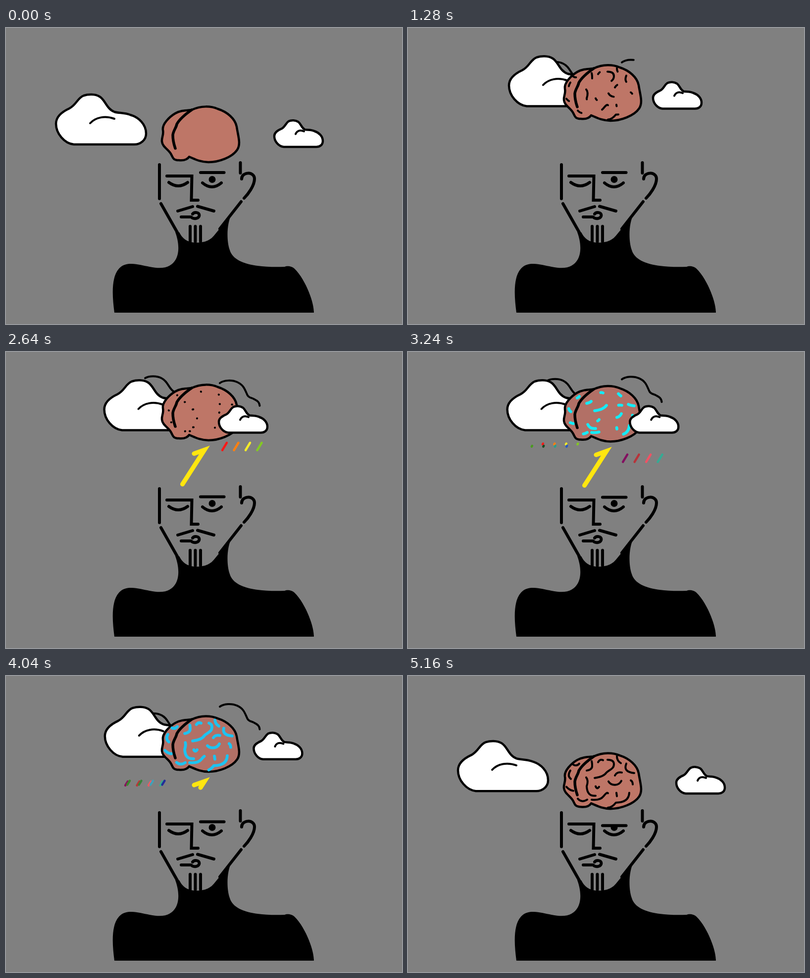
An HTML page that plays this animation: 800 px wide and 600 px high, repeating every 5200 ms.

```html
<!DOCTYPE html>
<html lang="en">
<head>
<meta charset="utf-8">
<title>Brain in the clouds</title>
<style>
html, body { margin: 0; width: 100%; height: 100%; overflow: hidden; background: #808080; }
svg { display: block; width: 800px; height: 600px; fill: none; stroke: #000; stroke-linecap: round; stroke-linejoin: round; }
.cloud { fill: #fff; stroke-width: 4.5; }
.thin { stroke-width: 4; }
.solid { fill: #000; stroke: none; }
</style>
</head>
<body>
<svg viewBox="0 0 800 600">
  <clipPath id="lid"><rect id="lidBox" x="380" y="293" width="80" height="60"/></clipPath>

  <path class="solid" d="M219 577C214 540 213 505 228 488C242 471 268 480 290 484C320 490 334 484 343 469C351 455 349 432 342 414L350 414C358 430 370 435 385 435C405 435 414 428 420 421L456 377C446 395 445 430 452 450C460 478 505 486 563 484C567 482 577 482 583 488C602 506 622 552 622 577Z"/>
  <g stroke-width="6">
    <path d="M310 277V346M313 356L347 416M475 352L432 407M473.500 273V294M476 306C476 291 502 290 502 306C502 320 488 338 481 345"/>
    <path d="M325 300H375.500L374.500 349H388" stroke-linejoin="miter"/>
    <path d="M329 313Q348 327 367 313M397 314Q416 330 435 314M347 371L377 362M387 361.500L420 371"/>
    <path d="M354 383H374C378 388 390.500 387 390.500 379.500C390.500 373 380 372.500 377 377"/>
    <path d="M372 402V433M382.500 402V433M393 402V433"/>
    <g clip-path="url(#lid)"><circle class="solid" cx="416.500" cy="307" r="7"/></g>
    <path id="brow" d="M393 293H440.500"/>
  </g>

  <path id="bolt" d="M356.500 361L401 291.500L380 299" stroke="#ffe60f" stroke-width="9" stroke-linejoin="miter" stroke-miterlimit="8" pathLength="1"/>

  <path id="waveL" class="thin" pathLength="1" d="M281 53C289 48 305 48 314 53C328 60 328 74 340 81"/>
  <path id="waveR" class="thin" pathLength="1" d="M432 63C440 57 456 56 467 61C481 67 483 78 488 88C492 94 496 92 502 96C508 99 512 102 512.500 109"/>

  <g id="left">
    <g id="rainL"></g>
    <path class="cloud" d="M137 236C118 234 101 214 101 194C101 179 115 169 128 163C143 155 144 142 157 137C166 134 180 133.500 189 139C201 146 203 164 219 170C228 173 238 171 251 176C268 181 283 195 283 214C283 228 271 236 259 236Z"/>
    <path class="thin" d="M170 193C181 181 200 177 219 184"/>
  </g>

  <g id="brain">
    <path id="lobe" stroke-width="4.500" d="M375 166C394 157 414 158 428 164C447 170 463 184 466 200C469 220 475 235 467 247C457 262 430 272 409 272C392 272 380 265 370 261C366 267 358 269 349 268C336 268 337 261 333 255C328 246 316 241 315 230C314 222 319 217 317 207C315 195 330 180 342 173C352 167 364 167 375 166Z"/>
    <g id="folds" transform="translate(0 2.5)"></g>
    <path stroke-width="5.500" d="M375 166C362 175 350 186 345 195C344 202 338 208 337 217C337 230 340 238 342 244"/>
  </g>

  <g id="right">
    <g id="rainR"></g>
    <path class="cloud" d="M561 241C551 240 542 230 542 219C542 211 550 207 557 204C564 200 565 193 571 189C577 186 585 187 590 190C596 194 597 203 604 206C610 207 617 206 623 209C632 212 640 219 640 229C640 237 634 241 627 241Z"/>
    <path class="thin" d="M585 215C588 208 594 206 602 209.500"/>
  </g>
</svg>
<script>
const LOOP = 5200, STEP = 40;
const $ = id => document.getElementById(id);
const clamp = v => Math.max(0, Math.min(1, v));
// Progress from a to b; runs from 1 down to 0 when a is later than b
const ramp = (t, a, b) => clamp((t - a) / (b - a));
const ease = (t, a, b) => { const u = ramp(t, a, b); return u * u * (3 - 2 * u); };
const mix = (a, b, k) => `color-mix(in srgb, ${b} ${100 * k}%, ${a})`;

function add(parent, attrs) {
  const path = document.createElementNS("http://www.w3.org/2000/svg", "path");
  for (const k in attrs) path.setAttribute(k, attrs[k]);
  return parent.appendChild(path);
}

const folds = [
  "M377 207Q395 205 401 196C407 190 416 189 416 179Q416 170 403 170",
  "M379 243Q362 245 361 224Q365 212 360 206",
  "M371 251Q388 253 395 244T404 238",
  "M447 237Q446 257 420 257Q412 267 404 267",
  "M431 213Q427 221 418 221T405 214",
  "M361 192Q372 190 372 183T371 173",
  "M362 251Q351 258 343 249",
  "M432 196Q422 194 418 202",
  "M457 197Q434 195 441 178",
  "M430 177Q422 172 422 163",
  "M454 220Q454 214 450 212",
  "M394 171Q388 168 384 175",
  "M386 225Q382 231 379 224",
  "M422 244L421 237",
  "M346 178Q341 184 334 180",
  "M329 209Q321 203 328 192",
  "M334 233Q326 232 320 225"
].map(d => add($("folds"), { d, pathLength: 1 }));

// Drops hang below their cloud, slide by (dx, dy) between two times and change colour
function rain({ id, colors, x, y, dx, dy, time: [t0, t1], life: [born, dead], w, h }) {
  const drops = colors.map(() => add($(id), { "stroke-width": 4.5 }));
  return t => {
    const u = (t - t0) / (t1 - t0);
    const size = ramp(t, born, born + 200) * ramp(t, dead, dead - 200);
    drops.forEach((drop, i) => {
      const cx = x + dx * u + i * 23.5, cy = y + dy * u, a = w * size / 2, b = h * size / 2;
      drop.style.display = size > 0 ? "" : "none";
      drop.setAttribute("d", `M${cx + a} ${cy - b}L${cx - a} ${cy + b}`);
      drop.style.stroke = mix(...colors[i], clamp(u));
    });
  };
}
const warm = [["#fc1a18", "#4b0a82"], ["#ff8010", "#95104e"], ["#f4ec28", "#f00a80"], ["#84c824", "#109cc8"]];
const cool = [["#4a9a20", "#2f7d32"], ["#1c4a24", "#48a048"], ["#28a08c", "#50a0d0"], ["#2858c0", "#221884"]];
const near = { id: "rainR", time: [2640, 3520], life: [2380, 3950], w: 9, h: 15 };
const far = { id: "rainL", time: [3520, 4320], life: [3200, 4800], w: 5, h: 8 };
const rains = [
  rain({ ...near, colors: warm, x: 553.5, y: 269, dx: -31, dy: 35 }),
  rain({ ...far, colors: warm, x: 163, y: 273, dx: -28, dy: 26 }),
  rain({ ...far, colors: cool, x: 150, y: 275.5, dx: -2, dy: 20 })
];

const move = (id, x, y) => $(id).setAttribute("transform", `translate(${x} ${y})`);
function trim(path, a, b) {
  path.style.display = b > a ? "" : "none";
  path.setAttribute("stroke-dasharray", `${b - a} 2`);
  path.setAttribute("stroke-dashoffset", -a);
}

function draw(t) {
  const there = Math.min(t, LOOP + 40 - t);   // out and back
  const drift = ease(there, 200, 2620);
  const cloudY = -77.5 * ease(t, 0, 1040) * (1 - ramp(t, 3900, LOOP) ** 1.2);
  const brainY = cloudY - 15.5 * drift;
  move("brain", 0, brainY);
  move("bolt", 0, brainY);
  move("left", 105.5 * ease(there, 100, 1400) - 8 * ease(there, 1500, 2250), cloudY);
  move("right", -112 * drift, cloudY);
  move("waveL", 0, brainY + 93 + 18 * (1 - drift));
  move("waveR", 0, cloudY + 77.5 - 9 * Math.sin((t - 2640) / 590));

  // The lid sinks slowly, shuts and springs open
  const sink = 3 * ramp(t, 2200, 4320) + 24 * ramp(t, 4500, 5120) ** 4;
  const lid = sink * ramp(t, LOOP, 5120) ** 1.4;
  move("brow", 0, lid);
  $("lidBox").setAttribute("y", 293 + lid);

  const leave = ramp(t, 4750, 4310);
  trim($("waveL"), 0, ramp(t, 600, 1250) * leave);
  trim($("waveR"), 0, ramp(t, 980, 2260) * leave);
  trim($("bolt"), ramp(t, 3750, 4200), ramp(t, 2280, 2560));

  // Folds grow from one end, shrink into the other and grow back
  const a = ramp(t, 1800, 900), b = Math.max(ramp(t, 2660, 1550), ramp(t, 2620, 4200));
  folds.forEach(fold => trim(fold, a, b));
  const tint = ramp(t, 2680, 3000) * ramp(t, 4900, 4320);
  $("folds").style.stroke = mix("#000", mix("#14ebf7", "#22aeee", ramp(t, 3520, 4320)), tint);
  $("folds").style.strokeWidth = 4 + 1.8 * tint;
  $("lobe").style.fill = mix("#be7667", "#b27066", tint);
  rains.forEach(fall => fall(t));
}

const start = performance.now();
function tick() {
  const t = (performance.now() - start) % LOOP;
  draw(Math.floor(t / STEP) * STEP);
  requestAnimationFrame(tick);
}
tick();
</script>
</body>
</html>
```
